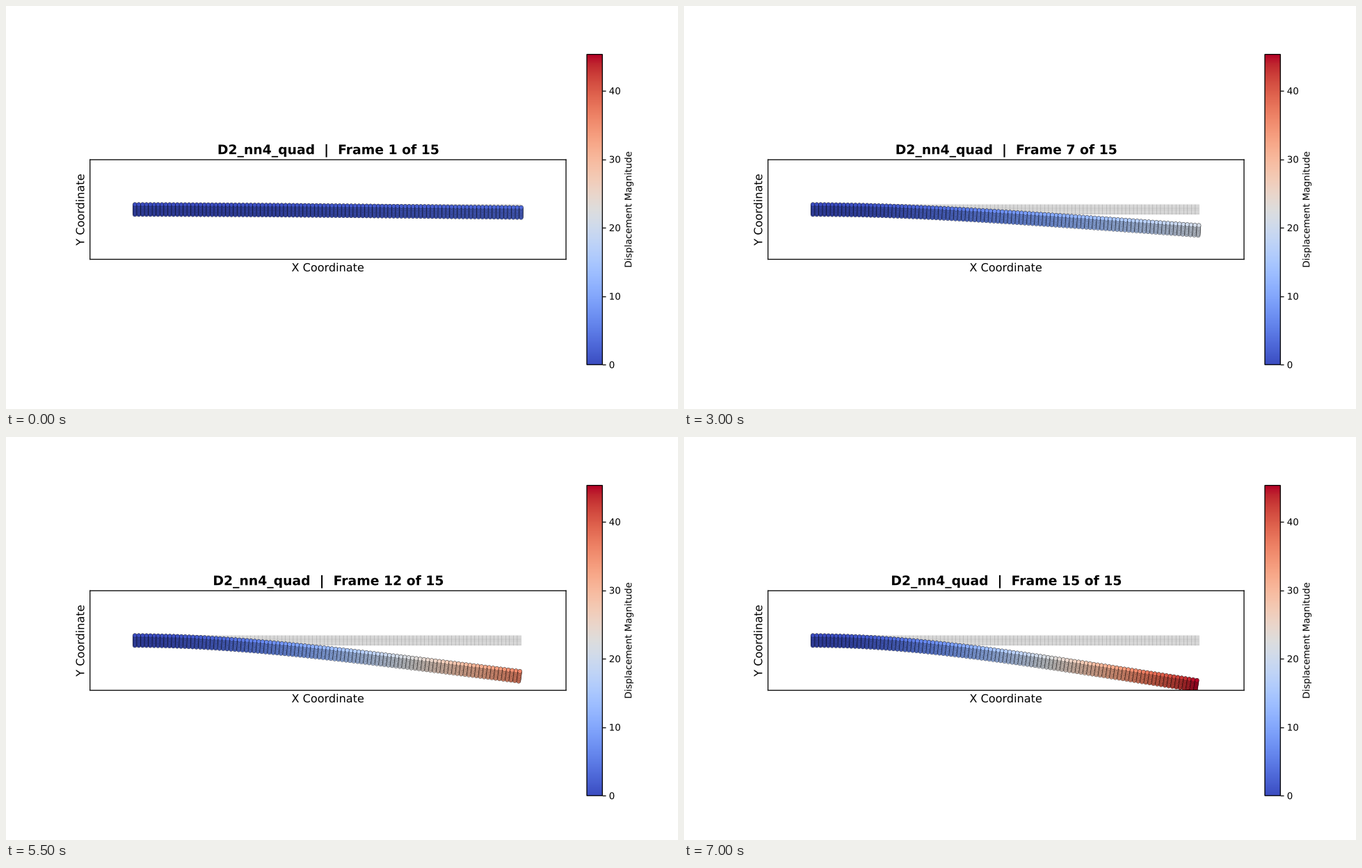
Animation, 966 px wide and 580 px high, one loop 7500 ms. Source, as a matplotlib script:

```python
import numpy as np
import matplotlib.pyplot as plt
from matplotlib import patheffects
from matplotlib.animation import FuncAnimation
from matplotlib.collections import PolyCollection

STEPS = 15
LENGTH, HEIGHT = 390.0, 10.0
NX, NY = 100, 8
TIP = 45.16       # tip deflection at full load
V_MAX = 45.32

# Unsnapped lines and text outlines keep everything at sub-pixel positions.
plt.rcParams.update({
    "font.family": "DejaVu Sans",
    "path.snap": False,
    "axes.linewidth": 0.96,
    "ytick.major.width": 0.96,
})

# Nodes run row by row from the bottom up, so the top row is drawn last.
xs = np.linspace(0, LENGTH, NX + 1)
ys = np.linspace(0, HEIGHT, NY + 1)
X, Y = np.meshgrid(xs, ys)


def deform(load):
    """Cantilever under uniform load, with foreshortening and rotated sections."""
    s = xs / LENGTH
    w = load * TIP * (s**4 - 4 * s**3 + 6 * s**2) / 3
    slope = load * TIP / LENGTH * (4 * s**3 - 12 * s**2 + 12 * s) / 3
    half_sq = slope**2 / 2
    steps = (half_sq[1:] + half_sq[:-1]) / 2 * np.diff(xs)
    shorten = np.concatenate([[0], np.cumsum(steps)])
    angle = np.arctan(slope)
    arm = Y - HEIGHT / 2
    dx = -shorten + arm * np.sin(angle)
    dy = -w + arm * (np.cos(angle) - 1)
    return dx, dy


def mesh_cells():
    return [
        [(x0, y0), (x1, y0), (x1, y1), (x0, y1)]
        for y0, y1 in zip(ys[:-1], ys[1:])
        for x0, x1 in zip(xs[:-1], xs[1:])
    ]


fig, ax = plt.subplots(figsize=(10, 6.00415), dpi=96.6)

ax.add_collection(PolyCollection(
    mesh_cells(), facecolor="lightgray", edgecolor="gray",
    linewidth=0.3, alpha=0.5, zorder=0.5))
nodes = ax.scatter(X.ravel(), Y.ravel(), c=np.zeros(X.size), s=20,
                   cmap="coolwarm", vmin=0, vmax=V_MAX,
                   edgecolors="black", linewidths=0.3)

ax.set_xlim(-V_MAX, LENGTH + V_MAX)
ax.set_ylim(-V_MAX, HEIGHT + V_MAX)
ax.set_aspect("equal")
ax.set_xticks([])
ax.set_yticks([])
ax.set_xlabel("X Coordinate", fontsize=12)
ax.set_ylabel("Y Coordinate", fontsize=12)
title = ax.set_title("", fontsize=14, fontweight="bold")

bar = fig.colorbar(nodes, ax=ax, fraction=0.046, pad=0.04)
bar.set_label("Displacement Magnitude")

labels = [title, ax.xaxis.label, ax.yaxis.label, bar.ax.yaxis.label,
          *bar.ax.get_yticklabels()]
plt.setp(labels, path_effects=[patheffects.Normal()])


def update(i):
    dx, dy = deform((i + 1) / STEPS)
    nodes.set_offsets(np.column_stack([(X + dx).ravel(), (Y + dy).ravel()]))
    nodes.set_array(np.hypot(dx, dy).ravel())
    title.set_text(f"D2_nn4_quad  |  Frame {i + 1} of {STEPS}")
    return nodes, title


anim = FuncAnimation(fig, update, frames=STEPS, interval=500, repeat=True)
plt.show()
```
